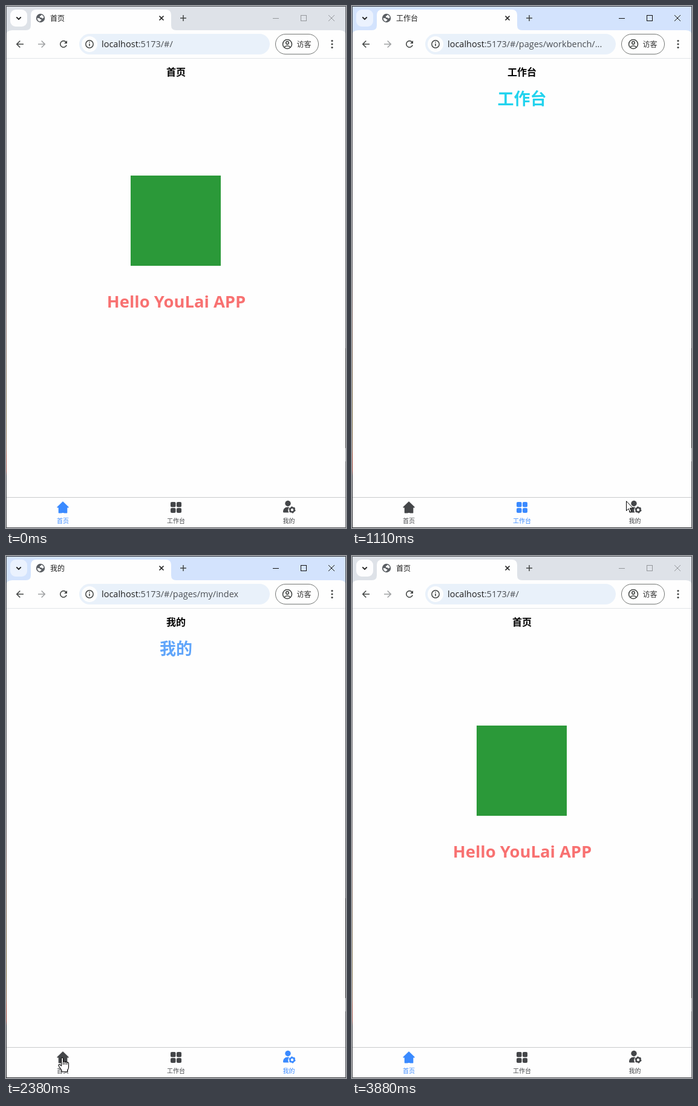
Recreate the animation shown at these times as an HTML page. Size 562 by 862 pixels, loop 3930 ms.

```html
<!DOCTYPE html>
<html lang="zh-CN">
<head>
<meta charset="utf-8">
<title>首页</title>
<style>
html, body { margin: 0; width: 100%; height: 100%; overflow: hidden; background: #fefefe; }
svg { display: block; width: 562px; height: 862px; font-family: "Open Sans", "Noto Sans CJK SC", "Noto Sans CJK", sans-serif; }
.cjk { font-family: "Noto Sans CJK SC", "Noto Sans CJK", sans-serif; }
.line { fill: none; stroke: #444746; stroke-width: 1.6; }
.mid { text-anchor: middle; }
</style>
</head>
<body>
<svg viewBox="0 0 562 862">
  <defs>
    <linearGradient id="edge" x1="0" y1="0" x2="0" y2="1">
      <stop offset="0" stop-color="#44474f"/>
      <stop offset=".5" stop-color="#5c5a60"/>
      <stop offset=".6" stop-color="#7c6460"/>
      <stop offset=".8" stop-color="#77683f"/>
      <stop offset=".85" stop-color="#85604a"/>
      <stop offset=".86" stop-color="#9a4a38"/>
      <stop offset=".89" stop-color="#8c3a30"/>
      <stop offset=".9" stop-color="#35363b"/>
      <stop offset="1" stop-color="#2b2c30"/>
    </linearGradient>
  </defs>
  <rect width="562" height="862" fill="#fefefe"/>

  <!-- title bar -->
  <rect id="bar" width="562" height="52"/>
  <rect id="search" x="7" y="6" width="28" height="28" rx="9"/>
  <path class="line" d="M17.3 18.3l3.7 3.7 3.7-3.7" style="stroke:#1f1f1f;stroke-width:1.9"/>
  <path d="M0 87V50Q0 40 10 40H33Q41 40 41 32V15Q41 6 50 6H264Q273 6 273 15V32Q273 40 281 40H552Q562 40 562 50V87Z" fill="#fefefe"/>
  <circle cx="57" cy="20" r="7.2" fill="#5a5e63"/>
  <path d="M58 14.6c2.400 .3 4.200 2 4.600 4.400l-2.200 1.700-1.700-1.500-2.700-.5-.2-1.900 2-.9zM51.600 19.700l3.700 .5 1.200 1.500 1.900 .5-.3 1.700-1.700 .8-.2 1c-2.600-.4-4.600-2.800-4.600-6z" fill="#fefefe"/>
  <text id="tab" class="cjk" x="73" y="24.500" font-size="12" fill="#1f1f1f"></text>
  <path class="line" d="M253.500 16.500l7 7m0-7l-7 7" style="stroke:#1f1f1f"/>
  <path class="line" d="M288 20h10m-5-5v10" style="stroke-width:1.500"/>
  <g id="buttons" fill="none">
    <path d="M441 20.500h10M487.500 15.500h9v9h-9z" shape-rendering="crispEdges"/>
    <path d="M533 15l10 10m0-10l-10 10"/>
  </g>

  <!-- toolbar -->
  <path class="line" d="M29 63H18m5.300-5.500L17.800 63l5.500 5.500"/>
  <path class="line" d="M53 63h11m-5.300-5.500l5.500 5.500-5.500 5.500" style="stroke:#a0a2a4"/>
  <path class="line" d="M99.500 60a5.300 5.300 0 1 0 .6 4.500"/>
  <path d="M101 57v5h-5z" fill="#444746"/>
  <rect x="121" y="46" width="315" height="34" rx="17" fill="#e9f1fa"/>
  <circle cx="138" cy="63" r="13" fill="#fefefe"/>
  <circle class="line" cx="138" cy="63" r="6.200" style="stroke-width:1.500"/>
  <path class="line" d="M138 62v4.300m0-7.300v1.600"/>
  <text x="158" y="68" font-size="14.5" fill="#1f1f1f">localhost<tspan id="path" fill="#4b4f54"></tspan></text>
  <rect x="445.500" y="46.500" width="71" height="33" rx="16.500" fill="none" stroke="#747775"/>
  <g class="line">
    <circle cx="465" cy="63" r="7.500"/>
    <circle cx="465" cy="60.800" r="2.300"/>
    <path d="M460 68c2.500-3 7.500-3 10 0"/>
  </g>
  <text class="cjk" x="480.500" y="67.500" font-size="12" fill="#333">访客</text>
  <g fill="#444746"><circle cx="539" cy="57.500" r="1.600"/><circle cx="539" cy="63" r="1.600"/><circle cx="539" cy="68.500" r="1.600"/></g>
  <path d="M0 86.500h562" stroke="#e2e4e8"/>

  <!-- page -->
  <text id="title" class="cjk mid" x="281" y="115" font-size="16" font-weight="700"></text>
  <text id="headline" class="cjk mid" x="281" y="163" font-size="27" font-weight="700"></text>
  <g id="welcome">
    <rect x="206" y="280" width="149" height="149" fill="#2b9939"/>
    <text class="mid" x="281.500" y="498" font-size="27.4" font-weight="700" fill="#f87171">Hello YouLai APP</text>
  </g>

  <!-- bottom tabs -->
  <path d="M0 811.500h562" stroke="#c9cacc"/>
  <g id="items">
    <g>
      <path d="M94 819l9 8.800h-2.400v9h-4.600v-5.300h-4v5.300h-4.600v-9H85z" stroke="currentColor" stroke-width="1.400" stroke-linejoin="round"/>
      <path d="M91 831h6v6h-6z"/>
      <text class="cjk mid" x="94" y="854" font-size="10">首页</text>
    </g>
    <g>
      <rect x="272" y="819" width="8.500" height="8.500" rx="2"/>
      <rect x="282" y="819" width="8" height="8.500" rx="2"/>
      <rect x="272" y="829" width="8.500" height="8" rx="2"/>
      <rect x="282" y="829" width="8" height="8" rx="2"/>
      <text class="cjk mid" x="281" y="854" font-size="10">工作台</text>
    </g>
    <g>
      <circle cx="466" cy="821.500" r="4.700"/>
      <path d="M458 835.500c0-5 3-8 7.500-8h3c-2.500 2.500-3 6-1 9h-8q-1.500 0-1.500-1z"/>
      <circle cx="473" cy="832" r="3.500" fill="none" stroke="currentColor" stroke-width="2.600"/>
      <circle cx="473" cy="832" r="4.900" fill="none" stroke="currentColor" stroke-width="1.400" stroke-dasharray="2.600 2.530"/>
      <text class="cjk mid" x="467.500" y="854" font-size="10">我的</text>
    </g>
  </g>

  <!-- window frame -->
  <g id="frame">
    <path d="M0 .5h562M0 861.500h562" stroke="#2f3136"/>
    <rect width="1" height="862" fill="url(#edge)"/>
    <path d="M561.500 0v862" stroke="#46484e"/>
    <path d="M561.500 565v165" stroke="#222327"/>
    <path d="M561.500 730v22" stroke="#85878b"/>
  </g>

  <g id="cursor" fill="#fff" stroke="#000" stroke-linejoin="round">
    <path id="arrow" d="M.5 .7v15.800l3.600-3.400 2.500 5.700 2.400-1-2.500-5.600h5z"/>
    <path id="hand" d="M-1.500 14V2Q-1.500 .5 0 .5T1.500 2v6q0-1.300 1.500-1.300t1.500 1.600q.3-1 1.600-1t1.500 1.600q.3-.8 1.400-.8t1.500 1.500v6.400q0 3-2 5v2.700H-1v-2.500l-4.300-6.200q-1.500-2-.7-2.900 1.300-1 2.700 .3z M1.500 8v4m3-3.500v3.500m3.100-3v3" stroke-width="1.100"/>
  </g>
</svg>
<script>
const LOOP = 3930;
const el = id => document.getElementById(id);
const set = (node, attrs) => { for (const k in attrs) node.setAttribute(k, attrs[k]); };
const show = (node, on) => { node.style.display = on ? "" : "none"; };
const write = (node, text) => { if (node.textContent !== text) node.textContent = text; };

const names = ["首页", "工作台", "我的"];
const paths = [":5173/#/", ":5173/#/pages/workbench/...", ":5173/#/pages/my/index"];
const accents = ["none", "#22d3ee", "#60a5fa"];

// Times at which tabs 1, 2 and 0 take effect in each part of the window.
const switches = { page: [650, 1560, 2560], path: [690, 1580, 2560], tab: [740, 1620, 2770] };
const current = (part, t) => switches[part].filter(at => t >= at).length % 3;

// Pointer moves: start, end, steps, from, to, easing power.
const moves = [
  [80, 410, 8, [111, 851], [276, 838], 1],
  [690, 930, 6, [276, 838], [449, 813], 1],
  [1110, 1350, 4, [453, 817], [465, 824], 1],
  [1620, 1960, 9, [465, 824], [171, 837], 2],
  [2000, 2380, 8, [167, 836], [93, 828], 1],
  [2770, 2980, 6, [93, 828], [66, 855], 1]
];

function pointer(t) {
  const [start, end, steps, from, to, power] = moves.filter(m => t >= m[0]).pop() || moves[0];
  const u = Math.min(1, Math.max(0, (t - start) / (end - start)));
  const stepped = Math.floor(u * (steps - 1) + 1e-6) / (steps - 1);
  const p = 1 - (1 - stepped) ** power;
  return from.map((v, i) => Math.round(v + (to[i] - v) * p));
}

function draw(t) {
  const active = t >= 600 && t < 3880;
  const page = current("page", t);

  set(el("bar"), { fill: active ? "#d3e3fd" : "#dee2e8" });
  set(el("search"), { fill: active ? "#ebf2fe" : "#fdfdfe" });
  set(el("buttons"), { stroke: active ? "#111" : "#94979b" });
  set(el("frame"), { opacity: active ? 1 : 0.85 });

  write(el("tab"), names[current("tab", t)]);
  write(el("path"), paths[current("path", t)]);
  write(el("title"), names[page]);
  write(el("headline"), page ? names[page] : "");
  set(el("headline"), { fill: accents[page] });
  show(el("welcome"), page === 0);

  [...el("items").children].forEach((item, i) => {
    const color = i === page ? "#3a8aff" : "#444649";
    set(item, { fill: color, color });
  });

  const [x, y] = pointer(t);
  const hand = x > 456 || Math.abs(x - 310) < 16 || (Math.abs(x - 95) < 8 && y < 840);
  set(el("cursor"), { transform: `translate(${x} ${y})` });
  show(el("cursor"), t >= 80 && t < 3310);
  show(el("hand"), hand);
  show(el("arrow"), !hand);
}

const began = performance.now();
function tick() {
  draw((performance.now() - began) % LOOP);
  requestAnimationFrame(tick);
}
tick();
</script>
</body>
</html>
```
